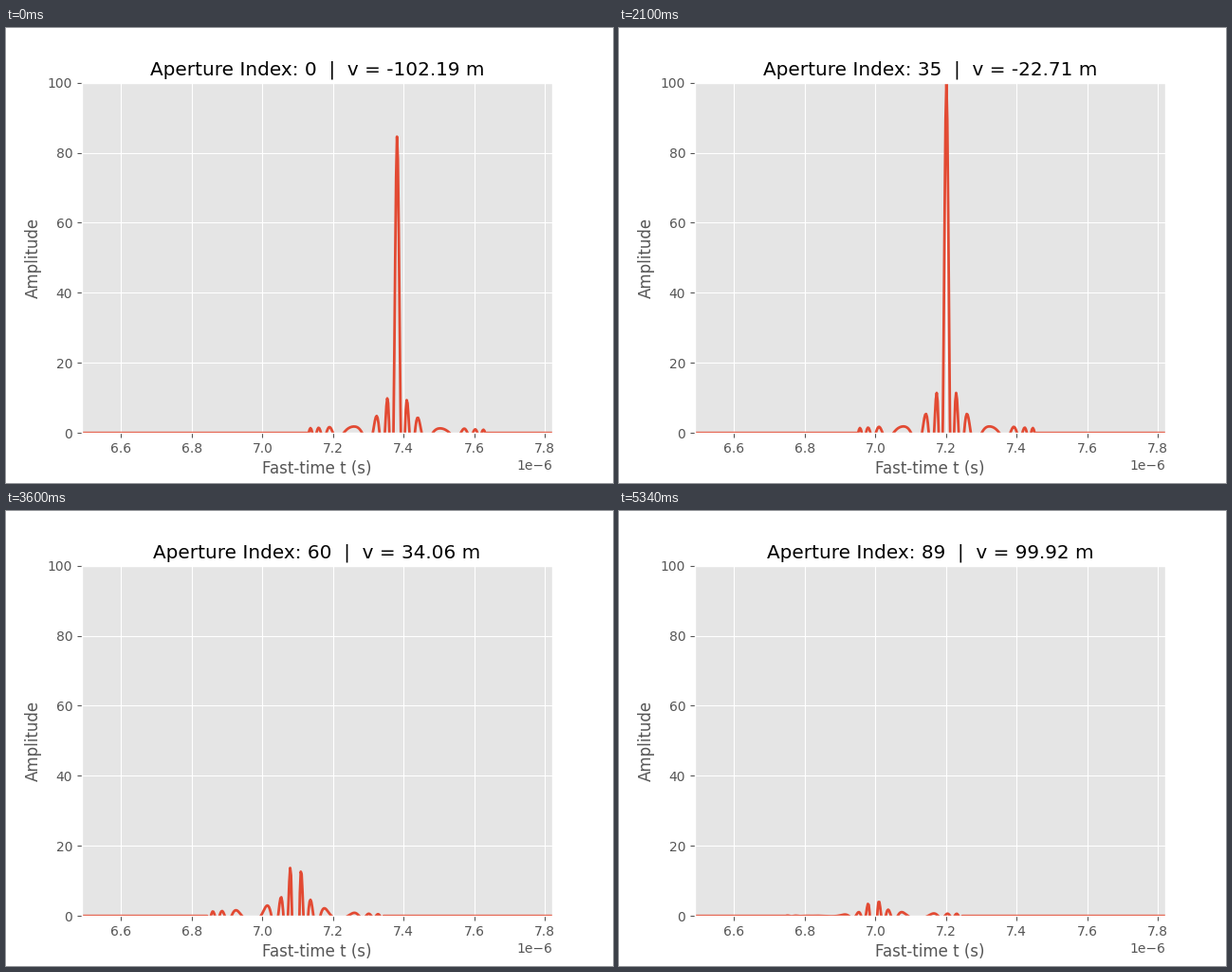
Animation of 640 by 480 pixels, one loop 5400 ms. Source, as a matplotlib script:

```python
import numpy as np
import matplotlib.pyplot as plt
from matplotlib.animation import FuncAnimation

# Radar and chirp
C = 3e8
FC, F0 = 200e6, 50e6        # carrier and half bandwidth
TP = 2.5e-7                 # pulse length
ALPHA = 2 * np.pi * F0 / TP

# Spotlight geometry
XC, YC = 1000, 300          # scene centre
X0, Y0 = 20, 60             # half size of the scene
L = 100                     # half aperture
RC = np.hypot(XC, YC)

# Slow-time (aperture) positions
xcc = RC ** 2 / XC
du = xcc * C / (FC + F0) / (4 * Y0) / 1.2 / 2
m = 2 * int(np.ceil(L / du))
v = du * np.arange(-m // 2, m // 2)

# Fast-time samples with a 10 % guard on both sides
dt = 1 / (8 * F0)
start = 2 / C * np.hypot(XC - X0, YC - Y0 - L)
stop = 2 / C * np.hypot(XC + X0, YC + Y0 + L) + TP
guard = 0.1 * (stop - start)
n = 2 * int(np.ceil(0.5 * (stop - start + 2 * guard) / dt))
t = start - guard + dt * np.arange(n)


def echo(dist):
    """Baseband chirp returned from a point at the given distance."""
    td = t - 2 * dist / C
    phase = 2 * np.pi * (FC - F0) * td + ALPHA * td ** 2 - 2 * np.pi * FC * t
    return np.where((td >= 0) & (td <= TP), np.exp(1j * phase), 0)


ref = np.conj(np.fft.fft(echo(RC)))


def compress(pos):
    """Real part of the matched filter output at one aperture position."""
    spectrum = np.fft.fft(echo(np.hypot(XC, YC - pos))) * ref
    return np.fft.fftshift(np.fft.ifft(spectrum)).real


plt.style.use("ggplot")
fig, ax = plt.subplots(figsize=(6.4, 4.8), dpi=100, facecolor="white")
line, = ax.plot(t, compress(v[0]), lw=2)
title = ax.set_title("")
ax.set_xlim(t[0], t[-1])
ax.set_ylim(0, 100)
ax.set_xlabel("Fast-time t (s)")
ax.set_ylabel("Amplitude")


def update(i):
    line.set_ydata(compress(v[i]))
    title.set_text(f"Aperture Index: {i}  |  v = {v[i]:.2f} m")
    return line, title


anim = FuncAnimation(fig, update, frames=m, interval=60, repeat=True,
                     repeat_delay=0, blit=False)
plt.show()
```
